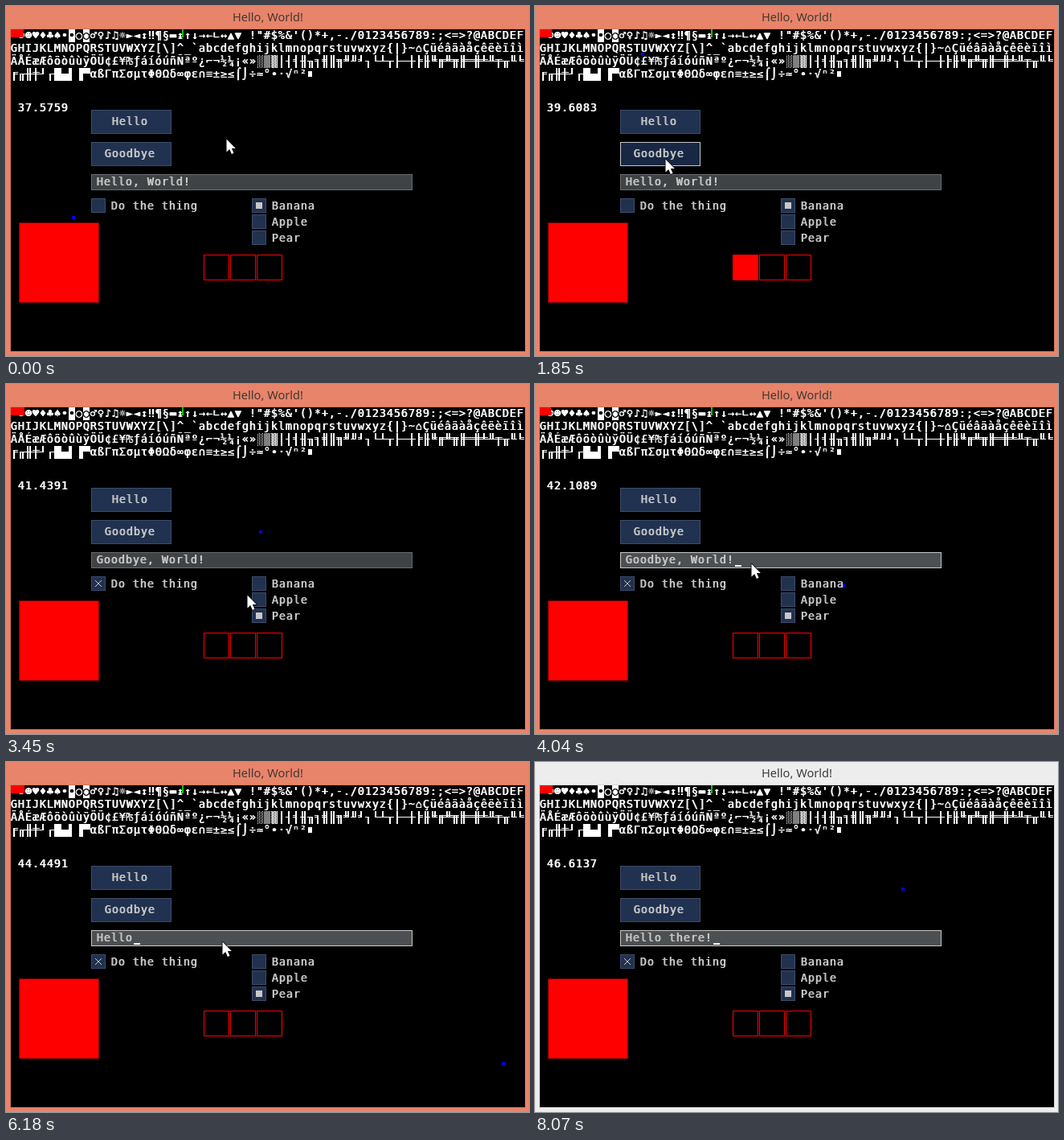
These frames come from a looping animation (651 by 435 pixels, 8170 ms). An HTML page with a canvas:

```html
<!DOCTYPE html>
<html lang="en">
<head>
<meta charset="utf-8">
<title>Hello, World!</title>
<style>
html, body { margin: 0; width: 100%; height: 100%; overflow: hidden; background: #000; }
canvas { display: block; }
</style>
</head>
<body>
<canvas id="stage" width="651" height="435"></canvas>
<script>
const LOOP = 8170;
const W = 651, H = 435;
const LEFT = 6, TOP = 29, CELL = 9, ROW = 16, COLS = 71;
const FONT = '13.5px "DejaVu Sans Mono", monospace';
const TITLE_FONT = '14.6px "Noto Sans", "Open Sans", sans-serif';

const stage = document.getElementById('stage').getContext('2d');
let g = stage;

function rect(x, y, w, h, color) {
  g.fillStyle = color;
  g.fillRect(x, y, w, h);
}

function panel(x, y, w, h, fill, edge) {
  rect(x, y, w, h, edge);
  rect(x + 1, y + 1, w - 2, h - 2, fill);
}

// struck twice: heavy stems, thin bars, like a terminal font
function glyph(ch, x, base, color) {
  g.fillStyle = color;
  g.fillText(ch, x + 3.6, base);
  g.fillText(ch, x + 4.4, base);
}

function print(str, x, base, color) {
  g.font = FONT;
  g.textAlign = 'center';
  [...str].forEach((ch, i) => glyph(ch, x + i * CELL, base, color));
}

// ---- character chart ----
const ASCII = Array.from({ length: 95 }, (_, i) => String.fromCharCode(32 + i)).join('');
const CHART = ' ☺☻♥♦♣♠•◘○◙♂♀♪♫☼►◄↕‼¶§▬↨↑↓→←∟↔▲▼' + ASCII +
  '⌂ÇüéâäàåçêëèïîìÄÅÉæÆôöòûùÿÖÜ¢£¥₧ƒáíóúñÑªº¿⌐¬½¼¡«»░▒▓' +
  '│┤╡╢╖╕╣║╗╝╜╛┐└┴┬├─┼╞╟╚╔╩╦╠═╬╧╨╤╥╙╘╒╓╫╪┘┌' +
  '█▄▌▐▀αßΓπΣσµτΦΘΩδ∞φε∩≡±≥≤⌠⌡÷≈°∙·√ⁿ²■ ';

// box lines by arm: [single, double]
const ARMS = {
  up: ['│┤╡╛└┴├┼╞╧╘╪┘', '╢╣║╝╜╟╚╩╠╬╨╙╫'],
  down: ['│┤╡╕┐┬├┼╞╤╒╪┌', '╢╖╣║╗╟╔╦╠╬╥╓╫'],
  left: ['┤╢╖╜┐┴┬─┼╨╥╫┘', '╡╕╣╗╝╛╩╦═╬╧╤╪'],
  right: ['└┴┬├─┼╟╨╥╙╓╫┌', '╞╚╔╩╦╠═╬╧╤╘╒╪']
};
const BLOCKS = { '█': [0, 0, 9, 16], '▄': [0, 7, 9, 9], '▌': [0, 0, 4, 16], '▐': [4, 0, 5, 16], '▀': [0, 0, 9, 7], '■': [1, 4, 5, 7] };
const SHADES = {
  '░': (x, y) => (x + 2 * (y % 2)) % 4 === 3,
  '▒': (x, y) => (x + y) % 2 === 1,
  '▓': (x, y) => (x + 2 * (y % 2)) % 4 !== 2
};

function boxLines(ch, x, y) {
  const weight = arm => ARMS[arm][0].includes(ch) ? 1 : ARMS[arm][1].includes(ch) ? 2 : 0;
  const up = weight('up'), down = weight('down'), left = weight('left'), right = weight('right');
  if (!(up || down || left || right)) return false;
  const stems = n => n === 2 ? [2, 5] : n ? [3] : [];
  const bars = n => n === 2 ? [5, 7] : n ? [7] : [];
  const wide = up === 2 || down === 2;
  const top = left === 2 || right === 2 ? 5 : 7;
  stems(up).forEach(s => rect(x + s, y, 2, 8, '#fff'));
  stems(down).forEach(s => rect(x + s, y + top, 2, 16 - top, '#fff'));
  bars(left).forEach(b => rect(x, y + b, wide ? 7 : 5, 1, '#fff'));
  bars(right).forEach(b => rect(x + (wide ? 2 : 3), y + b, wide ? 7 : 6, 1, '#fff'));
  return true;
}

function chartCell(ch, x, y) {
  if (boxLines(ch, x, y)) return;
  if (BLOCKS[ch]) {
    const [dx, dy, w, h] = BLOCKS[ch];
    rect(x + dx, y + dy, w, h, '#fff');
  } else if (SHADES[ch]) {
    for (let j = 0; j < ROW; j++)
      for (let i = 0; i < 8; i++)
        if (SHADES[ch](i, j)) rect(x + i, y + j, 1, 1, '#fff');
  } else if (ch === '◘' || ch === '◙') {
    rect(x, y, 8, ROW, '#fff');
    glyph(ch === '◘' ? '•' : '○', x, y + 12, '#000');
  } else {
    glyph(ch, x, y + 12, '#fff');
  }
}

function makeChart() {
  const layer = document.createElement('canvas');
  layer.width = 640;
  layer.height = ROW * 4;
  g = layer.getContext('2d');
  g.font = FONT;
  g.textAlign = 'center';
  [...CHART].forEach((ch, i) => chartCell(ch, i % COLS * CELL, Math.floor(i / COLS) * ROW));
  g = stage;
  return layer;
}
const chart = makeChart();

// ---- timing ----
// runs of picture updates: first, last, count
const RUNS = [
  [40, 840, 27], [870, 1670, 27], [1700, 2510, 28], [2550, 3360, 25], [3390, 4190, 27],
  [4230, 5010, 22], [5050, 5830, 17], [5870, 6640, 18], [6690, 7500, 22], [7530, 8070, 15]
];
const TICKS = [0];
for (const [a, b, n] of RUNS)
  for (let k = 0; k < n; k++) TICKS.push(Math.round((a + (b - a) * k / (n - 1)) / 10) * 10);

const CLOCK = [[0, 37.5759], [1850, 39.6083], [2890, 40.8033], [4040, 42.1089], [5200, 43.4253], [7110, 45.5056], [8070, 46.6137]];
const POINTER = [
  [0, 274, 164], [250, 274, 164], [950, 160, 146], [1350, 160, 146], [1680, 162, 189], [1950, 162, 189],
  [2270, 115, 247], [2480, 115, 247], [2860, 322, 261], [3030, 322, 261], [3130, 319, 284], [3330, 319, 284],
  [3620, 269, 222], [7650, 269, 222], [8020, 660, 450]
];

const linear = u => u;
const smooth = u => u * u * (3 - 2 * u);

function along(keys, t, col, ease) {
  let i = 0;
  while (i < keys.length - 2 && t >= keys[i + 1][0]) i++;
  const a = keys[i], b = keys[i + 1];
  const u = Math.min(1, (t - a[0]) / (b[0] - a[0]));
  return a[col] + (b[col] - a[col]) * ease(u);
}

function bounce(u, n) {
  const m = ((u % (2 * n)) + 2 * n) % (2 * n);
  return n - Math.abs(m - n);
}

function noise(n) {
  const s = Math.sin(n * 12.9898 + 4.1) * 43758.5453;
  return s - Math.floor(s);
}

// ---- widgets ----
const PRESS = 110;
const CLICKS = [
  [1130, 'Hello'], [1790, 'Goodbye'], [2330, 'Do the thing'], [2920, 'Apple'], [3200, 'Pear'], [3690, 'input']
];
const RADIOS = ['Banana', 'Apple', 'Pear'];
const LIGHT = '#c8c8c8';

function stateAt(t) {
  const s = { focus: '', down: '', greet: 'Hello, World!', checked: false, radio: 'Banana' };
  for (const [at, name] of CLICKS) {
    if (t < at) break;
    s.focus = name;
    if (t < at + PRESS) { s.down = name; break; }
    if (name === 'Hello' || name === 'Goodbye') s.greet = name + ', World!';
    if (name === 'Do the thing') s.checked = true;
    if (RADIOS.includes(name)) s.radio = name;
  }
  const erased = Math.floor((t - 4330) / 67);
  if (erased > 0) s.greet = s.greet.slice(0, Math.max(0, s.greet.length - erased));
  const typed = Math.floor((t - 5600) / 108);
  if (typed > 0) s.greet = 'Hello there!'.slice(0, typed);
  return s;
}

function control(name, x, y, w, h, s) {
  const over = s.mx >= x && s.mx < x + w && s.my >= y && s.my < y + h;
  const fill = s.down === name ? '#182844' : over ? '#2b4a76' : '#213250';
  const edge = s.focus === name && !RADIOS.includes(name) ? LIGHT : '#3d4b68';
  panel(x, y, w, h, fill, edge);
}

function button(name, y, textX, s) {
  control(name, 106, y, 100, 30, s);
  print(name, textX, y + 19, LIGHT);
}

function checkbox(s) {
  control('Do the thing', 106, 239, 18, 18, s);
  if (s.checked) {
    g.strokeStyle = LIGHT;
    g.lineWidth = 1;
    g.beginPath();
    g.moveTo(111, 244); g.lineTo(119, 252);
    g.moveTo(119, 244); g.lineTo(111, 252);
    g.stroke();
  }
  print('Do the thing', 131, 253, LIGHT);
}

function radio(name, y, s) {
  control(name, 306, y, 18, 18, s);
  if (s.radio === name) rect(311, y + 5, 8, 8, LIGHT);
  print(name, 331, y + 14, LIGHT);
}

function input(s) {
  const on = s.focus === 'input';
  panel(106, 209, 400, 20, on ? '#4d5052' : '#404345', on ? LIGHT : '#696b6d');
  print(s.greet, 113, 223, LIGHT);
  if (on) rect(114 + s.greet.length * CELL, 225, 8, 2, '#fff');
}

function arrow(x, y) {
  const shape = [[0, 0], [0, 16], [3.7, 12.6], [6.4, 18.5], [9, 17.3], [6.4, 11.6], [11.3, 11.6]];
  g.beginPath();
  shape.forEach(([dx, dy]) => g.lineTo(x + dx + .5, y + dy + 1.5));
  g.closePath();
  g.lineJoin = 'round';
  g.lineWidth = 1.6;
  g.strokeStyle = '#000';
  g.stroke();
  g.fillStyle = '#fff';
  g.fill();
}

function draw(now) {
  const time = now % LOOP;
  let tick = TICKS.length - 1;
  while (tick > 0 && TICKS[tick] > time) tick--;
  const t = TICKS[tick];
  const clock = along(CLOCK, t, 1, linear);
  const s = stateAt(t);
  s.mx = Math.round(along(POINTER, t, 1, smooth));
  s.my = Math.round(along(POINTER, t, 2, smooth));

  const active = t < 8040;
  rect(0, 0, W, H, active ? '#e8846a' : '#ededed');
  g.font = TITLE_FONT;
  g.textAlign = 'center';
  g.fillStyle = active ? '#443832' : '#3c3c3c';
  g.fillText('Hello, World!', 326, 19);

  rect(LEFT - 1, TOP - 1, 642, 402, active ? '#cf765f' : '#d4d4d4');
  rect(LEFT, TOP, 640, 400, '#000');
  g.drawImage(chart, LEFT, TOP);
  print(clock.toFixed(4), 15, 131, '#fff');

  panel(16, 269, 100, 100, '#f00', '#800000');
  for (let i = 0; i < 3; i++)
    panel(246 + i * 33, 309, 32, 32, i === 0 && s.down ? '#f00' : '#000', '#f00');

  const run = 100.15 * (clock - 40.8033);
  rect(Math.round(4.9 + bounce(246.5 + run, 640)), Math.round(28.2 + bounce(90.3 + run, 400)), 4, 4, '#00f');

  button('Hello', 129, 132, s);
  button('Goodbye', 169, 123, s);
  input(s);
  checkbox(s);
  RADIOS.forEach((name, i) => radio(name, 239 + i * 20, s));

  // frame-time meter
  rect(LEFT, TOP, 14 + Math.round(noise(tick) * 4), 10, '#f00');
  rect(219, TOP, 2, 10, '#0c0');

  if (s.mx < W && s.my < H) arrow(s.mx, s.my);
}

function loop() {
  draw(performance.now());
  requestAnimationFrame(loop);
}
loop();
</script>
</body>
</html>
```
